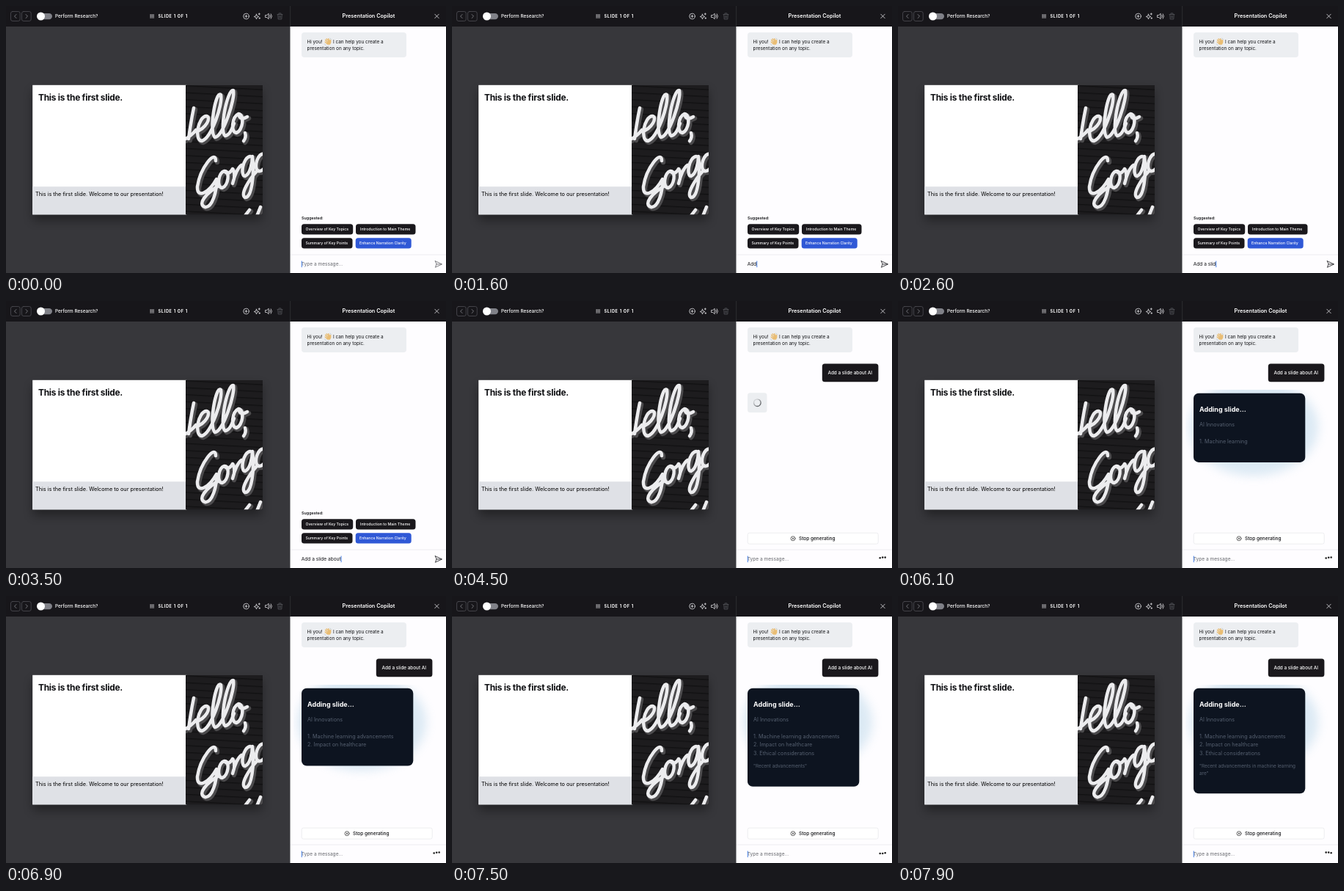
These frames come from a looping animation (600x364 px, 8000 ms). An HTML page:

```html
<!DOCTYPE html>
<html lang="en">
<head>
<meta charset="utf-8">
<title>Presentation Copilot</title>
<style>
  html, body { margin: 0; width: 100%; height: 100%; overflow: hidden; background: #fff; }
  svg { display: block; width: 100vw; height: 100vh; }
  text { font: 6.4px Inter, "Open Sans", sans-serif; fill: #101114; white-space: pre; }
  .medium { font-weight: 500; }
  .light { fill: #fff; }
  .chip { font-size: 5.2px; font-weight: 500; fill: #fff; }
  .item { font-size: 7.2px; fill: #566070; }
  .quote { font-size: 6.4px; fill: #566070; }
  .icon { fill: none; stroke: #e4e4e7; stroke-width: .8; stroke-linecap: round; stroke-linejoin: round; }
  .script { fill: none; stroke-linecap: round; stroke-linejoin: round; }
</style>
</head>
<body>
<svg viewBox="0 0 600 364">
  <defs>
    <filter id="soft" x="-30%" y="-30%" width="160%" height="160%"><feGaussianBlur stdDeviation="7"/></filter>
    <pattern id="siding" width="20" height="9.5" patternUnits="userSpaceOnUse" patternTransform="rotate(3)">
      <rect width="20" height="9.5" fill="#1d1c1e"/><rect width="20" height="1.4" fill="#111112"/>
    </pattern>
    <clipPath id="photoBox"><rect x="245" y="108" width="105" height="176.3"/></clipPath>
    <clipPath id="chatBox"><rect x="392" y="121" width="200" height="190"/></clipPath>
    <linearGradient id="spin" x1="0" y1="0" x2="1" y2="1">
      <stop offset=".2" stop-color="#606266"/><stop offset=".8" stop-color="#cfd1d4"/>
    </linearGradient>
  </defs>

  <!-- Editor -->
  <rect width="388" height="364" fill="#37373b"/>
  <rect width="600" height="28" fill="#17161a"/>
  <g class="icon">
    <g stroke="#4e4f55"><rect x="6.5" y="7.5" width="12.7" height="13" rx="2.5"/><rect x="21.5" y="7.5" width="12.7" height="13" rx="2.5"/></g>
    <path stroke="#8a8b90" d="M14 11.5l-2.5 2.5 2.5 2.5M27 11.5l2.5 2.5-2.5 2.5"/>
    <circle cx="327.5" cy="14" r="3.8"/><path d="M325.9 14h3.2M327.5 12.4v3.2"/>
    <path d="M341.5 11.2l.9 2.4 2.4.9-2.4.9-.9 2.5-.9-2.5-2.4-.9 2.4-.9zM345.3 9.8v2.2M344.2 10.9h2.2M345.8 15.8v1.6M345 16.6h1.6"/>
    <path d="M354 12.5h1.7l2.5-2.2v7.4l-2.5-2.2H354zM360 12.4q1.3 1.6 0 3.2M361.3 10.8q2.5 3.2 0 6.4"/>
    <path stroke="#55565b" d="M370 11.5h7M372 11.3v-1.4h3v1.4M370.7 11.7l.5 6.3h4.6l.5-6.3M372.7 13.3v3M374.3 13.3v3"/>
    <path d="M584.8 11.2l5.4 5.4M590.2 11.2l-5.4 5.4"/>
  </g>
  <rect x="43" y="9.9" width="20" height="8.4" rx="4.2" fill="#808188"/>
  <circle cx="47.5" cy="14" r="5.5" fill="#fff"/>
  <text class="medium light" x="67" y="16.1">Perform Research?</text>
  <path d="M196.5 12.2h5.4M196.5 14.1h5.4M196.5 16h5.4" stroke="#e4e4e7" stroke-width="1.2" stroke-dasharray="1.3 .7"/>
  <text class="light" x="207.5" y="16.1" style="font-size:5.6px;font-weight:700;letter-spacing:.12em">SLIDE 1 OF 1</text>

  <rect x="37" y="115" width="312" height="177" fill="#000" opacity=".38" filter="url(#soft)"/>
  <rect x="36.2" y="107.8" width="210" height="176.5" fill="#fff"/>
  <rect x="36.2" y="246.2" width="210" height="38.1" fill="#dfe1e6"/>
  <text x="44" y="129" style="font-size:11.9px;font-weight:700;letter-spacing:-.02em">This is the first slide.</text>
  <text x="40" y="258.5" style="font-size:7.3px;fill:#000">This is the first slide. Welcome to our presentation!</text>

  <g clip-path="url(#photoBox)">
    <rect x="245" y="107" width="105" height="178" fill="url(#siding)"/>
    <g id="lettering" class="script">
      <path d="M256 139Q252 158 249 181M243 182Q252 178 259 169"/>
      <path d="M259 171C272 168 281 151 273 150C262 151 256 183 267 184C280 180 296 134 293 121C286 114 276 172 285 179C296 178 313 126 310 115C302 112 290 172 299 177C305 176 308 168 311 160"/>
      <path d="M317 147C308 151 306 172 314 173C323 170 326 148 317 147Q319 157 329 151M326 173Q328 179 324 184"/>
      <path d="M286 211C286 195 265 220 261 246C260 264 277 254 287 236C288 252 281 276 271 274C261 270 272 256 290 245"/>
      <path d="M298 225C289 227 287 248 295 248C303 245 306 225 298 225Q303 232 309 222Q314 228 309 242Q314 222 321 217"/>
      <path d="M333 205C323 206 319 232 326 232C333 229 336 213 336 205C339 230 335 262 326 261C319 257 331 237 343 224"/>
      <path d="M353 202C343 198 337 222 344 225Q349 226 354 219"/>
      <path d="M322 291L332 278M341 289L347 274"/>
    </g>
    <use href="#lettering" x="2" y="2" stroke="#4c4b4d" stroke-width="6.4"/>
    <use href="#lettering" stroke="#ececee" stroke-width="4.5"/>
  </g>

  <!-- Chat -->
  <rect x="387.5" y="28" width="212.5" height="336" fill="#fefdff"/>
  <path d="M387.7 0V28" stroke="#37383c" stroke-width=".7"/>
  <text class="light" x="494.5" y="16.4" text-anchor="middle" style="font-size:7.3px;font-weight:600">Presentation Copilot</text>
  <rect x="403" y="36" width="143" height="34" rx="4" fill="#eceef1"/>
  <text x="410.5" y="50.6">Hi you!</text>
  <g class="script" stroke="#e9bd74" stroke-width="1.5">
    <path d="M435.6 46.2l3.6 4M437.2 44.9l3.4 3.7M439.6 44.7l2.1 3.5M435.2 49l3 2.8M442.6 46.4v3.6"/>
    <ellipse cx="440.2" cy="50.2" rx="1.9" ry="1.8" fill="#e9bd74"/>
    <path stroke="#b3bcc4" stroke-width=".6" d="M441.8 44q1.4.4 1.6 1.6M434.4 51.8q.4 1.4 1.7 1.7"/>
  </g>
  <text x="446" y="50.6">I can help you create a</text>
  <text x="410.5" y="60.2">presentation on any topic.</text>

  <g id="suggestions">
    <text x="403" y="290.9" style="font-size:5.4px;font-weight:600">Suggested:</text>
    <g fill="#1a181c">
      <rect x="403" y="297.2" width="70.2" height="14.3" rx="3.5"/>
      <rect x="477" y="297.2" width="81.5" height="14.3" rx="3.5"/>
      <rect x="403" y="316.3" width="69.5" height="14.3" rx="3.5"/>
      <rect x="476.7" y="316.3" width="76" height="14.3" rx="3.5" fill="#2f58d6"/>
    </g>
    <text class="chip" x="408.5" y="306.2">Overview of Key Topics</text>
    <text class="chip" x="483" y="306.2">Introduction to Main Theme</text>
    <text class="chip" x="408.5" y="325.3">Summary of Key Points</text>
    <text class="chip" x="482" y="325.3">Enhance Narration Clarity</text>
  </g>

  <g id="reply">
    <rect x="504.8" y="85.4" width="76.6" height="24.8" rx="3.5" fill="#1a181c"/>
    <text class="medium light" x="512.5" y="100" style="font-size:6.35px">Add a slide about AI</text>
    <g id="loading">
      <rect x="403" y="125.3" width="26.5" height="26.7" rx="3.5" fill="#eceef1"/>
      <circle id="spinner" cx="416.3" cy="138.7" r="4.8" fill="none" stroke="url(#spin)" stroke-width="1.3"/>
    </g>
    <g id="card">
      <g clip-path="url(#chatBox)">
        <ellipse cx="485" cy="172" rx="88" ry="66" fill="#8dbddb" opacity=".3" filter="url(#soft)"/>
      </g>
      <rect id="cardBox" x="403" y="125.7" width="152.3" height="71" rx="7" fill="#0d1420"/>
      <text class="light" x="411" y="151" style="font-size:9px;font-weight:700">Adding slide...</text>
      <g id="cardText"></g>
    </g>
    <rect x="403.2" y="316.2" width="178" height="15" rx="2.5" fill="#fff" stroke="#e6e6ea" stroke-width=".7"/>
    <circle class="icon" cx="465" cy="323.8" r="3" style="stroke:#333;stroke-width:.7"/>
    <path class="icon" d="M463.9 322.7l2.2 2.2M466.1 322.7l-2.2 2.2" style="stroke:#333;stroke-width:.8"/>
    <text class="medium" x="473" y="326.1" style="font-size:6.5px">Stop generating</text>
    <g id="dots" fill="#222"><circle cx="583.7" r="1.3"/><circle cx="587.2" r="1.3"/><circle cx="590.7" r="1.3"/></g>
  </g>

  <path d="M388 339H600" stroke="#e8e8ec" stroke-width=".8"/>
  <text id="input" x="402.8" y="354.2" style="font-size:6.55px"></text>
  <rect id="caret" y="347.6" width=".9" height="8.6" fill="#2f6fe0"/>
  <path id="send" class="icon" d="M585.4 347.7L594.4 352L585.4 356.3L587 352ZM587 352H594"/>
</svg>
<script>
  const LOOP = 8000, SENT = 4400, CARD = 5800;
  const $ = id => document.getElementById(id);
  const show = (id, on) => $(id).style.display = on ? '' : 'none';

  // Each entry is [time, text added at that time].
  const typing = [
    [1100, 'A'], [1400, 'd'], [1600, 'd'], [1800, ' '], [2000, 'a'], [2100, ' '], [2200, 's'],
    [2300, 'l'], [2400, 'i'], [2600, 'd'], [2700, 'e'], [2800, ' '], [2900, 'a'], [3100, 'b'],
    [3200, 'o'], [3400, 'u'], [3500, 't'], [3700, ' '], [3900, 'A'], [4000, 'I']
  ];
  const topic = [[CARD, 'AI'], [5900, ' Innovations']];
  const outline = [
    [6000, '1. Machine'], [6100, ' learning'], [6200, ' advancements'],
    [6400, '\n2.'], [6500, ' Impact'], [6600, ' on'], [6800, ' healthcare'],
    [7000, '\n3.'], [7100, ' Ethical'], [7200, ' considerations']
  ];
  const narration = [
    [7400, 'Recent'], [7500, ' advancements'], [7600, ' in'],
    [7700, ' machine'], [7800, ' learning'], [7900, '\nare']
  ];
  const streamed = (parts, t) => parts.filter(([at]) => t >= at).map(([, s]) => s).join('');
  const linesOf = s => s ? s.split('\n') : [];

  function drawCard(t) {
    const items = linesOf(streamed(outline, t));
    const spoken = streamed(narration, t);
    const quotes = linesOf(spoken && `"${spoken}"`);
    const row = (cls, y, s) => `<text class="${cls}" x="411" y="${y}">${s}</text>`;
    $('cardText').innerHTML = row('item', 170.6, streamed(topic, t)) +
      items.map((s, i) => row('item', 193.6 + i * 11.5, s)).join('') +
      quotes.map((s, i) => row('quote', 234 + i * 9.5, s)).join('');
    const bottom = (items.length ? 208.3 + items.length * 11.6 : 197) +
      (quotes.length ? 7 + quotes.length * 9.6 : 0);
    $('cardBox').setAttribute('height', bottom - 125.7);
  }

  function draw(t) {
    const sent = t >= SENT;
    const typed = sent ? '' : streamed(typing, t);
    const input = $('input');
    input.textContent = typed || 'Type a message...';
    input.style.fill = typed ? '#101114' : '#66686d';
    $('caret').setAttribute('x', 402.8 + (typed ? input.getComputedTextLength() : 0));
    $('send').style.stroke = typed ? '#18191c' : '#606166';

    show('send', !sent);
    show('suggestions', !sent);
    show('reply', sent);
    show('loading', t < CARD);
    show('card', t >= CARD);
    if (!sent) return;

    $('spinner').setAttribute('transform', `rotate(${t * 0.36} 416.3 138.7)`);
    [...$('dots').children].forEach((dot, i) =>
      dot.setAttribute('cy', 350.3 + 0.8 * Math.sin(t / 130 + i)));
    if (t >= CARD) drawCard(t);
  }

  let start;
  function tick(now) {
    start ??= now;
    draw((now - start) % LOOP);
    requestAnimationFrame(tick);
  }
  draw(0);
  requestAnimationFrame(tick);
</script>
</body>
</html>
```
